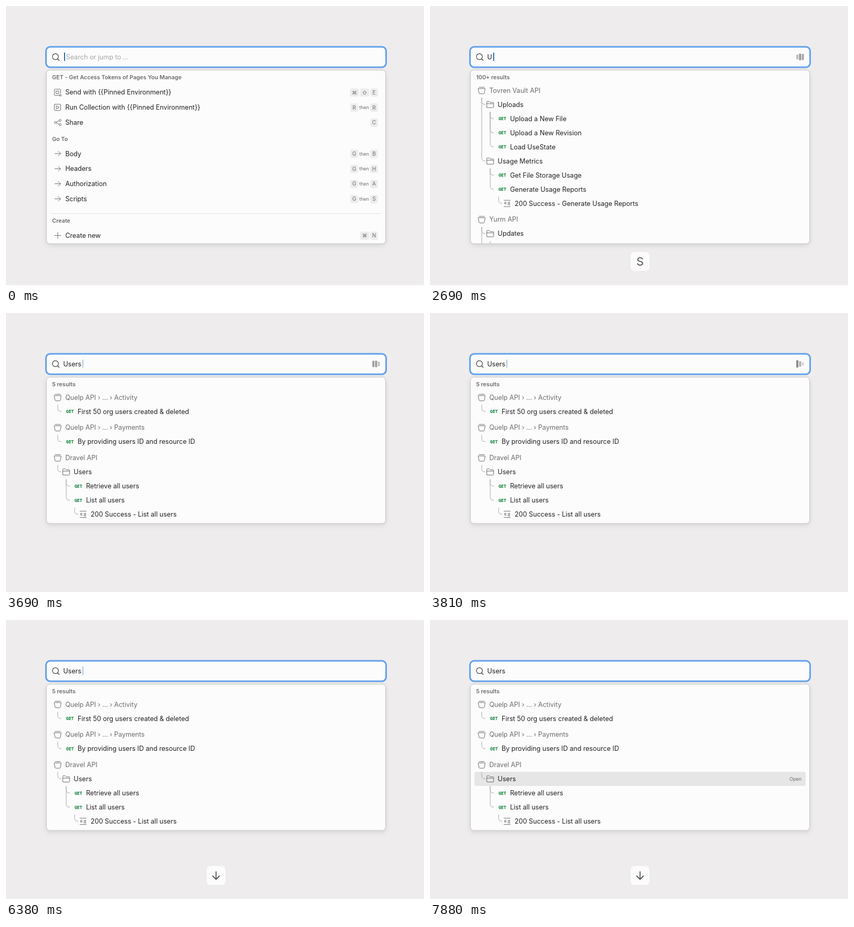
Write an HTML page that moves like this. It is 800x533 px and loops after 8000 ms.

```html
<!DOCTYPE html>
<html lang="en">
<head>
<meta charset="utf-8">
<title>Search palette</title>
<style>
  html, body { margin: 0; width: 100%; height: 100%; overflow: hidden; background: #eeecec; }
  svg { display: block; width: 800px; height: 533px; }
  text { font: 12.6px Inter, sans-serif; fill: #212121; white-space: pre; }
  .muted { fill: #6b6b6b; }
  .head { font-size: 10.8px; font-weight: 600; fill: #6b6b6b; }
  .key { font-size: 9.9px; fill: #6b6b6b; text-anchor: middle; }
  .then { font-size: 9px; fill: #6b6b6b; text-anchor: middle; }
  .get { font: 700 8.2px "Noto Sans Mono", monospace; fill: #007f31; }
  .eg { font-size: 7.4px; font-weight: 600; fill: #6b6b6b; text-anchor: middle; }
  .icon { fill: none; stroke: #6b6b6b; stroke-width: 1; stroke-linecap: round; stroke-linejoin: round; }
  .branch { fill: none; stroke: #a6a6a6; stroke-width: 1; }
  #placeholder { fill: #a6a6a6; }
  #panel { fill: #fcfcfc; stroke: #c6c6c6; filter: drop-shadow(0 3px 4px #0000001c); }
  #cap text { font-size: 22px; fill: #555; text-anchor: middle; }
</style>
</head>
<body>
<svg viewBox="0 0 800 533">
  <clipPath id="inside"><rect x="78" y="122" width="648" height="331.5" rx="6"/></clipPath>

  <rect x="76.5" y="78" width="651" height="39" rx="8" fill="#fcfcfc" stroke="#62a1ec" stroke-width="3"/>
  <g fill="none" stroke="#3a3a3a" stroke-width="1.2" stroke-linecap="round">
    <circle cx="94.6" cy="96.8" r="5.7"/><path d="M98.8 101l3 3"/>
  </g>
  <text id="placeholder" x="114.8" y="101.7">Search or jump to ...</text>
  <text id="query" x="109.5" y="101.7"></text>
  <rect id="caret" y="89" width="1.9" height="16" fill="#1767b8"/>
  <g id="loader"></g>

  <rect id="panel" x="77.5" y="122.5" width="649" rx="6.5"/>
  <g clip-path="url(#inside)">
    <g id="highlight">
      <rect x="85" y="290" width="634" height="27" rx="3.5" fill="#e6e6e6"/>
      <text x="711" y="307" class="then" style="text-anchor:end">Open</text>
    </g>
    <g id="home"></g><g id="many"></g><g id="some"></g><g id="few"></g>
  </g>

  <g id="cap">
    <rect x="384" y="470" width="36" height="36" rx="7" fill="#fcfcfc"/>
    <text id="capText" x="402" y="496"></text>
    <path id="capArrow" d="M402 481v14.5M395.5 489l6.5 6.5 6.5-6.5" fill="none" stroke="#555" stroke-width="1.8" stroke-linecap="round" stroke-linejoin="round"/>
  </g>
</svg>
<script>
const $ = id => document.getElementById(id);
const LOOP = 8000;

const text = (x, cy, str, cls = '', drop = 4.5) =>
  `<text x="${x}" y="${cy + drop}" class="${cls}">${str}</text>`;
const heading = (cy, str) => text(88.2, cy, str, 'head', 3.95);
const icon = (name, x, y) => `<path class="icon" transform="translate(${x} ${y})" d="${icons[name]}"/>`;

const icons = {
  send: 'M3 6H-5.5Q-6.5 6-6.5 5V-5Q-6.5-6-5.5-6H4.5Q5.5-6 5.5-5V2.5M-3-2.5H2V2.5H-3zM4 4.5H6.5V7H4z',
  run: 'M-5.5-6H4.5Q5.5-6 5.5-5V5Q5.5 6 4.5 6H-5.5Q-6.5 6-6.5 5V-5Q-6.5-6-5.5-6zM-2.5-3L3 0-2.5 3z',
  share: 'M-6.5 0a2 2 0 1 0 4 0a2 2 0 1 0-4 0M2.5-4a2 2 0 1 0 4 0a2 2 0 1 0-4 0M2.5 4a2 2 0 1 0 4 0a2 2 0 1 0-4 0M-2.7-.9L2.7-3.2M-2.7.9L2.7 3.2',
  arrow: 'M-5.5 0H5.5M1-4.5L5.5 0 1 4.5',
  plus: 'M-6 0H6M0-6V6',
  collection: 'M-5-6H5M-6.5-3.5H6.500L5 5.500Q4.800 6.500 3.800 6.500H-3.800Q-4.800 6.500-5 5.500z',
  folder: 'M-6.5 5V-5Q-6.5-6-5.5-6H-2L0-4H5.5Q6.5-4 6.5-3V5Q6.5 6 5.5 6H-5.5Q-6.5 6-6.5 5zM-6.5-1.5H6.5',
  example: 'M-6-6H6M-6 6H6'
};

// Right-aligned shortcut such as "G then B".
function shortcut(keys, cy) {
  let right = 711.7, out = '';
  for (const key of keys.split(' ').reverse()) {
    const word = key === 'then';
    const width = word ? 19.5 : /\w/.test(key) ? 14.5 : 17.5;
    if (!word) out += `<rect x="${right - width}" y="${cy - 7.7}" width="${width}" height="15.6" rx="3" fill="#ececec"/>`;
    out += text(right - width / 2, cy, key, word ? 'then' : 'key', word ? 3.2 : 3.5);
    right -= width + 2;
  }
  return out;
}

const action = (cy, name, label, keys) =>
  icon(name, 99, cy) + text(113.4, cy, label) + shortcut(keys, cy + .3);

$('home').innerHTML =
  heading(136.5, 'GET - Get Access Tokens of Pages You Manage') +
  action(164.9, 'send', 'Send with {{Pinned Environment}}', '⌘ ⇧ E') +
  action(193.7, 'run', 'Run Collection with {{Pinned Environment}}', 'R then R') +
  action(222.5, 'share', 'Share', 'C') +
  heading(253.7, 'Go To') +
  ['Body', 'Headers', 'Authorization', 'Scripts']
    .map((label, i) => action(282 + i * 28.8, 'arrow', label, 'G then ' + 'BHAS'[i])).join('') +
  '<path d="M85 396.5H719" stroke="#e4e4e4"/>' +
  heading(410.5, 'Create') +
  action(438.5, 'plus', 'Create new', '⌘ N');

// One row per line: indentation is depth; "/" folder, ">" request, "=" example, otherwise a collection.
function tree(title, source) {
  let y = 134.2, out = heading(136.5, title);
  const parents = [];
  for (const line of source.trim().split('\n')) {
    const [, indent, mark, label] = line.match(/^( *)([\/>=]?)(.*)$/);
    const depth = indent.length, x = 99 + depth * 16.2;
    y += depth || y < 140 ? 27 : 30.7;
    parents[depth] = y;
    if (depth) out += `<path class="branch" d="M${x - 16.2} ${parents[depth - 1] + 14}V${y - 6}q0 6 7 6"/>`;
    if (mark === '>') {
      out += text(x - .2, y, 'GET', 'get', 3) + text(x + 21.8, y, label);
    } else {
      out += icon({ '/': 'folder', '=': 'example' }[mark] || 'collection', x, y);
      if (mark === '=') out += text(x, y, 'e.g', 'eg', 2);
      out += text(x + 14.4, y, label, depth ? '' : 'muted');
    }
  }
  return out;
}

$('many').innerHTML = tree('100+ results', `
Tovren Vault API
 /Uploads
  >Upload a New File
  >Upload a New Revision
  >Load UseState
 /Usage Metrics
  >Get File Storage Usage
  >Generate Usage Reports
   =200 Success - Generate Usage Reports
Yurm API
 /Updates
  >Update User Access
 /User Management`);

$('some').innerHTML = tree('20 results', `
Tovren Vault API
 /Uploads
  >Load UseState
Yurm API
 /Updates
  >Update User Access
 /User Management
  >Get User Details
  >Use Storage amount
   =200 Success - Use Storage amount
Quelp API › ... › Activity
 >First 50 org users created &amp; deleted`);

$('few').innerHTML = tree('5 results', `
Quelp API › ... › Activity
 >First 50 org users created &amp; deleted
Quelp API › ... › Payments
 >By providing users ID and resource ID
Dravel API
 /Users
  >Retrieve all users
  >List all users
   =200 Success - List all users`);

$('loader').innerHTML = '<rect width="4" rx="1"/>'.repeat(3);
const bars = [...$('loader').children];

// [start time, value] steps
const queries = [[0, ''], [2250, 'U'], [2750, 'Us'], [3060, 'Use'], [3440, 'User'], [3690, 'Users']];
const views = [[0, 'home'], [2250, 'many'], [3060, 'some'], [3690, 'few']];
const caps = [[0, ''], [1690, 'U'], [2250, 'S'], [2750, 'E'], [3060, 'R'], [3440, 'S'], [3690, ''], [6100, '↓']];
const blinks = [60, 630, 1190, 1690, 3250, 3810, 4250, 4750, 5250, 5750, 6250, 6750, 7250];
const SELECT = 7250;

const current = (steps, t) => steps.filter(([start]) => start <= t).pop()[1];
const clamp = v => Math.max(0, Math.min(1, v));
const ease = v => 1 - (1 - clamp(v)) ** 2;
const show = (id, on) => $(id).style.display = on ? '' : 'none';

function caretOpacity(t) {
  const past = blinks.filter(b => b <= t);
  if (!past.length) return 1;
  const k = ease((t - past[past.length - 1]) / 160);
  const low = t >= SELECT ? 0 : .35;
  return low + (1 - low) * (past.length % 2 ? 1 - k : k);
}

function drawLoader(t) {
  show('loader', t >= 2250 && t < 3970);
  const swing = Math.abs(t - 3810) / 420 % 2;
  const peak = 2 * (swing > 1 ? 2 - swing : swing);
  bars.forEach((bar, i) => {
    const far = Math.abs(i - peak), height = 14 - 3.5 * far, shade = 140 + 38 * far;
    bar.setAttribute('x', 701 + i * 5.3);
    bar.setAttribute('y', 97.3 - height / 2);
    bar.setAttribute('height', height);
    bar.setAttribute('fill', `rgb(${shade},${shade},${shade})`);
  });
}

function draw(now) {
  const t = now % LOOP;
  const query = current(queries, t), view = current(views, t), cap = current(caps, t);

  $('query').textContent = query;
  show('placeholder', !query);
  $('caret').setAttribute('x', query ? 111.5 + $('query').getComputedTextLength() : 111.1);
  $('caret').style.opacity = caretOpacity(t);

  for (const [, id] of views) show(id, id === view);
  $('panel').setAttribute('height', view === 'few' ? 279.5 : 331.5);
  $('highlight').style.opacity = ease((t - SELECT) / 250);

  show('cap', cap);
  $('cap').style.opacity = clamp((t - (t < 6100 ? 1690 : 6100)) / 120);
  $('capText').textContent = cap === '↓' ? '' : cap;
  show('capArrow', cap === '↓');

  drawLoader(t);
  requestAnimationFrame(() => draw(performance.now() - start));
}

const start = performance.now();
draw(0);
</script>
</body>
</html>
```
